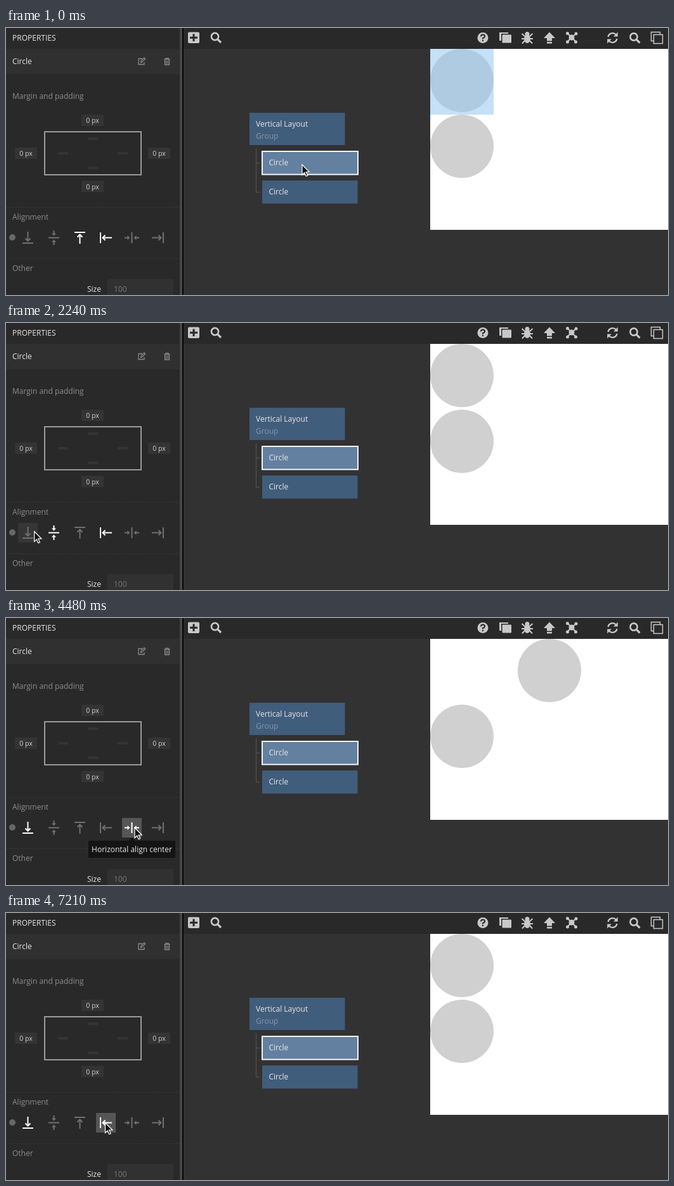
An HTML page that plays this animation: 1044 by 422 pixels, repeating every 8470 ms.

```html
<!DOCTYPE html>
<html lang="en">
<head>
<meta charset="utf-8">
<title>Alignment panel</title>
<style>
html, body { margin: 0; width: 100%; height: 100%; overflow: hidden; background: #323232; }
svg { display: block; width: 1044px; height: 422px; }
text { font: 12px "Open Sans", sans-serif; fill: #e6e6e6; }
.dim { fill: #8c8c8c; }
.px { font-size: 10.5px; fill: #d0d0d0; text-anchor: middle; }
.line { fill: none; stroke: #c8c8c8; stroke-width: 2; }
.mid { text-anchor: middle; }
</style>
</head>
<body>
<svg viewBox="0 0 1044 422">
  <defs>
    <g id="edge" fill="none" stroke="currentColor" stroke-width="2">
      <path d="M-8.5 8.5H8.5M0 -9.5V4.5M-4 1L0 5L4 1"/>
    </g>
    <g id="center" fill="none" stroke="currentColor" stroke-width="2">
      <path d="M-8.5 0H8.5M0 -11.5V-5M0 11.5V5"/>
      <path d="M-3.5 -7H3.5L0 -3ZM-3.5 7H3.5L0 3Z" fill="currentColor" stroke="none"/>
    </g>
    <g id="lens" class="line"><circle cx="-1.5" cy="-1.5" r="5.6" stroke-width="2.6"/><path d="M2.8 2.8L8 8" stroke-width="3.2"/></g>
  </defs>

  <rect width="1044" height="422" fill="#323232"/>
  <rect x="280" width="764" height="33" fill="#292929"/>
  <rect width="274" height="422" fill="#292929"/>
  <rect y="33" width="274" height="40" fill="#303030"/>
  <rect x="274" width="4" height="422" fill="#464646"/>
  <rect x="278" width="2" height="422" fill="#060606"/>

  <text x="10" y="20">PROPERTIES</text>
  <text x="10" y="57">Circle</text>
  <g fill="none" stroke="#8a8a8a" stroke-width="1.3">
    <path d="M215 48.5H209V57.5H218V54M212.5 54.5L213 52L218 47L219.7 48.7L214.7 53.8Z"/>
    <path d="M249.5 49.5H258.5M252 49V47.7H256V49M250.5 50V58H257.5V50M252.7 51.5V56.5M255.3 51.5V56.5"/>
  </g>
  <text class="dim" x="10" y="112">Margin and padding</text>
  <rect x="61" y="164" width="152" height="68" fill="none" stroke="#9a9a9a" stroke-width="2"/>
  <path d="M129 175H145M82 198H98M176 198H192M129 221H145" stroke="#343434" stroke-width="4"/>
  <g id="fields"></g>
  <path d="M0 283.5H274M0 364.5H274" stroke="#363636" stroke-dasharray="2 1"/>
  <text class="dim" x="10" y="303">Alignment</text>
  <circle cx="10" cy="331" r="5" fill="#686868"/>
  <g id="buttons"></g>
  <text class="dim" x="10" y="384">Other</text>
  <text x="128" y="417">Size</text>
  <rect x="160" y="397" width="104" height="25" fill="#313131"/>
  <text x="170" y="417" style="fill:#777">100</text>

  <g fill="#c8c8c8">
    <path fill-rule="evenodd" d="M289 6.500H303Q305 6.500 305 8.500V22Q305 24 303 24H289Q287 24 287 22V8.500Q287 6.500 289 6.500ZM294.500 9.500V13.800H290V16.800H294.500V21H297.500V16.800H302V13.800H297.500V9.500Z"/>
    <use href="#lens" x="331" y="15"/>
    <circle cx="752" cy="15.500" r="8.500"/>
    <path d="M749 13.500Q749 10.500 752 10.500T755 13.200Q755 15 752 16V17.500M752 18.800V21" fill="none" stroke="#292929" stroke-width="2"/>
    <path d="M778 7H792V9H781V20H778Z"/><rect x="782.500" y="10.500" width="14.500" height="13" rx="1"/>
    <ellipse cx="822" cy="17" rx="5" ry="7"/><circle cx="822" cy="9.500" r="3.500"/>
    <path class="line" stroke-width="1.600" d="M813.500 9L818 13M830.500 9L826 13M813 17H831M814 24.500L818 20M830 24.500L826 20"/>
    <path d="M857 6.500L866 16H861V20.500H853V16H848ZM853 22H861V24.500H853Z"/>
    <circle cx="892" cy="15" r="4.500"/>
    <path class="line" d="M885 8L892 15L899 9M885 22L892 15L899 22"/>
    <circle cx="885.500" cy="8.500" r="2.500"/><circle cx="899" cy="9" r="2.500"/><circle cx="885.500" cy="22" r="2.500"/><circle cx="898.500" cy="22" r="2.500"/>
    <path class="line" style="stroke-width:2.400" d="M949.500 14A7.300 7.300 0 0 1 962 10.500M963.500 17A7.300 7.300 0 0 1 951 20.500"/>
    <path d="M964.800 6.500V13.500H958ZM948.200 24.500V17.500H955Z"/>
    <use href="#lens" x="991.500" y="15.500"/>
    <path class="line" style="stroke-width:1.500" d="M1021 20.500H1017.500V6.500H1031.500V10M1021.500 10.500H1035.500V24.500H1021.500Z"/>
  </g>

  <path d="M394.500 190V259.500H400M394.500 213.500H400" fill="none" stroke="#555"/>
  <rect x="384" y="134" width="150.500" height="51" fill="#415d7c"/>
  <text x="394" y="155.500">Vertical Layout</text>
  <text x="394" y="174.500" style="fill:#8597ab">Group</text>
  <rect x="404" y="195" width="151" height="36.500" fill="#6480a0" stroke="#f4f4f4" stroke-width="2"/>
  <text x="414.500" y="216.500">Circle</text>
  <rect x="404" y="241" width="150.500" height="36.500" fill="#415d7c"/>
  <text x="414.500" y="262.500">Circle</text>

  <rect x="669" y="33" width="375" height="286" fill="#fff"/>
  <circle id="ball" cx="719" cy="83" r="50" fill="#d0d0d0"/>
  <circle cx="719" cy="187" r="50" fill="#d0d0d0"/>
  <rect id="glow" x="669" y="33" width="100" height="104" fill="#96c8f0" fill-opacity=".55"/>

  <g id="tips"></g>
  <path id="cursor" d="M0 0V16L3.700 12.500L6.200 18.300L8.700 17.200L6.200 11.500H11.300Z" fill="#111" stroke="#fff" stroke-width="1.200"/>
</svg>
<script>
const $ = id => document.getElementById(id);
const LOOP = 8470, STEP = 70;

const add = (parent, tag, attrs, text = '') => {
  const el = document.createElementNS('http://www.w3.org/2000/svg', tag);
  for (const key in attrs) el.setAttribute(key, attrs[key]);
  el.textContent = text;
  return parent.appendChild(el);
};

for (const [x, y] of [[136.5, 146], [31.5, 198], [241.5, 198], [136.5, 250.5]]) {
  add($('fields'), 'rect', { x: x - 17.5, y: y - 9, width: 35, height: 18, rx: 1, fill: '#343434' });
  add($('fields'), 'text', { x, y: y + 4, class: 'px' }, '0 px');
}

// Alignment buttons: bottom, middle, top, left, center, right
const buttons = [['edge', 0], ['center', 0], ['edge', 180], ['edge', 90], ['center', 90], ['edge', -90]]
  .map(([shape, turn], i) => {
    const x = 34.5 + 41 * i;
    const g = add($('buttons'), 'g', { transform: `translate(${x} 331.5)` });
    const back = add(g, 'rect', { x: -15.5, y: -15.5, width: 31, height: 31 });
    const icon = add(g, 'use', { href: '#' + shape, transform: `rotate(${turn})` });
    return { x, back, icon };
  });

// Tooltips: button, label, width, fade-in span, fade-out span, peak opacity
const tips = [
  [1, 'Vertical align center', 119, 1400, 1610, 1820, 2030, 1],
  [2, 'Vertical align top', 103, 3430, 3570, 3640, 3780, 1],
  [4, 'Horizontal align center', 137, 3710, 3920, 4480, 4690, 1],
  [5, 'Horizontal align right', 126, 5560, 5700, 5740, 5880, 0.75],
].map(([i, label, width, in0, in1, out0, out1, peak]) => {
  const x = buttons[i].x, g = add($('tips'), 'g', {});
  add(g, 'rect', { x: x - width / 2, y: 352, width, height: 27, fill: '#141414' });
  add(g, 'path', { d: `M${x - 5} 352L${x} 347L${x + 5} 352Z`, fill: '#141414' });
  add(g, 'text', { x, y: 370, class: 'mid' }, label);
  return { g, in0, in1, out0, out1, peak };
});

// Cursor moves: start, end, target x, target y
const START = [467, 216];
const moves = [
  [50, 910, 78, 325], [950, 1050, 85, 328], [1700, 2300, 43.5, 329.5],
  [3040, 3690, 203, 331.5], [4900, 5390, 243, 331.5], [6250, 6790, 156.5, 331.5],
];

const ramp = (t, a, b) => Math.min(1, Math.max(0, (t - a) / (b - a)));
const smooth = u => u * u * (3 - 2 * u);
const latest = (t, steps) => steps.reduce((value, [at, next]) => t >= at ? next : value, null);

function cursorAt(t) {
  let [x, y] = START;
  for (const [a, b, toX, toY] of moves) {
    const u = smooth(ramp(t, a, b));
    x += (toX - x) * u;
    y += (toY - y) * u;
  }
  return [x, y];
}

function draw(t) {
  const [x, y] = cursorAt(t);
  $('cursor').setAttribute('transform', `translate(${x} ${y})`);
  $('glow').style.display = x > 403 && y < 232 ? '' : 'none';
  $('ball').setAttribute('cx', latest(t, [[0, 719], [4480, 857], [5810, 994], [7140, 719]]));

  const vertical = latest(t, [[0, 2], [1400, 1], [2800, 0]]);
  const horizontal = latest(t, [[0, 3], [4480, 4], [5670, 5], [7070, 3]]);
  const pressed = latest(t, [[0, -1], [1400, 1], [2660, 0], [4270, 4], [5600, 5], [6930, 3]]);
  buttons.forEach((b, i) => {
    const over = Math.abs(x - b.x) < 15.5 && Math.abs(y - 331.5) < 15.5;
    b.back.setAttribute('fill', !over ? 'none' : i === pressed ? '#565656' : '#363636');
    b.icon.style.color = i === vertical || i === horizontal ? '#fff' : '#707070';
  });
  for (const { g, in0, in1, out0, out1, peak } of tips)
    g.setAttribute('opacity', peak * ramp(t, in0, in1) * (1 - ramp(t, out0, out1)));
}

const origin = performance.now();
function tick() {
  const t = (performance.now() - origin) % LOOP;
  draw(Math.floor(t / STEP) * STEP);
  requestAnimationFrame(tick);
}
tick();
</script>
</body>
</html>
```
